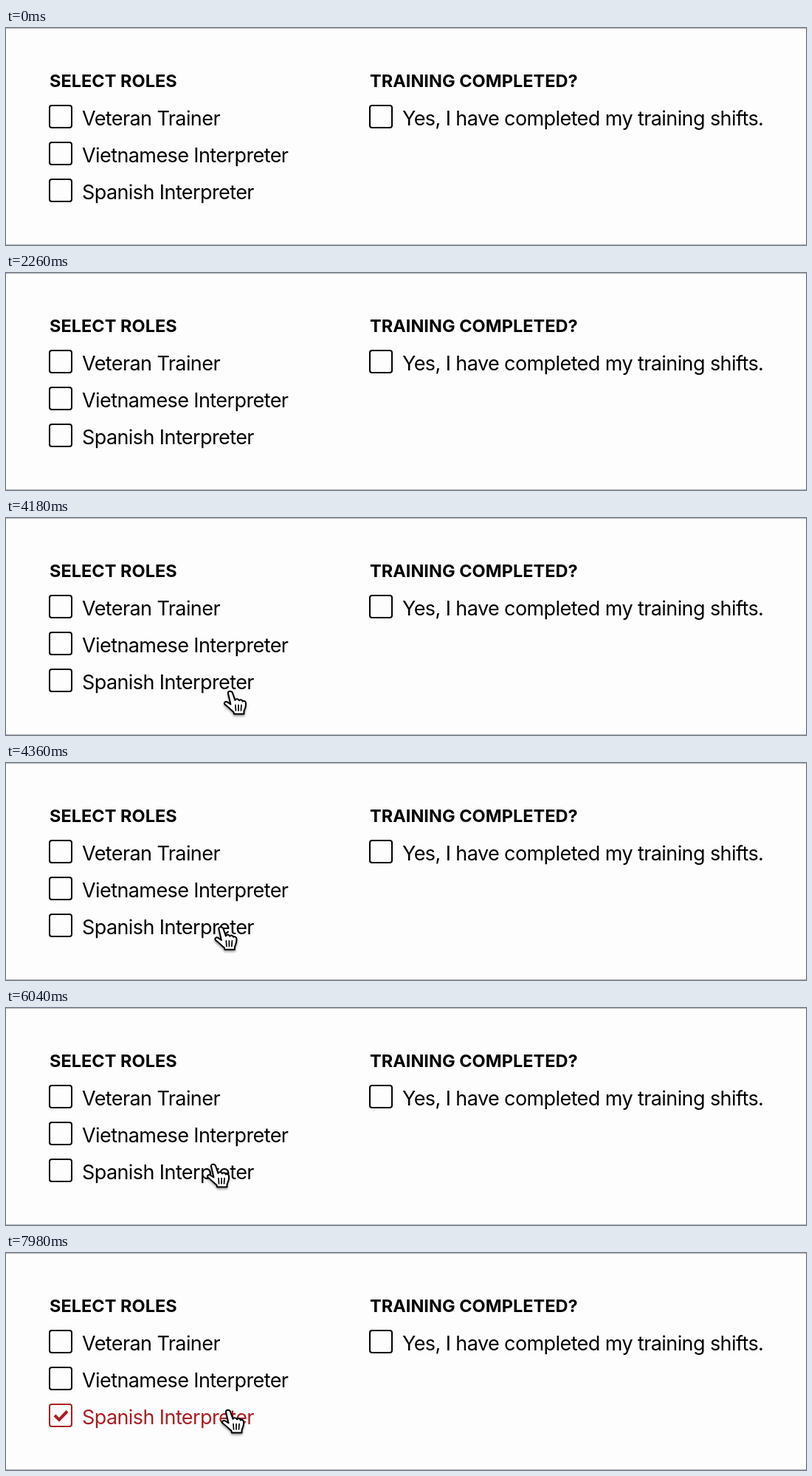
Animation of 1084x294 px, one loop 8 s. Source, as an HTML page:

```html
<!DOCTYPE html>
<html lang="en">
<head>
<meta charset="utf-8">
<title>Select roles</title>
<style>
  html, body { margin: 0; width: 100%; height: 100%; overflow: hidden; background: #fdfdfd; }
  svg { display: block; width: 1084px; height: 294px; }
  text { font: 400 27px Inter, "Open Sans", sans-serif; letter-spacing: -0.59px; fill: currentColor; }
  .heading { font-weight: 700; font-size: 23.5px; letter-spacing: 0.03px; }
  .option { color: #000; }
  .option rect { fill: none; stroke: currentColor; stroke-width: 2; }
  .tick { fill: none; stroke: currentColor; stroke-width: 4; visibility: hidden; }
  .checked { color: #a91e22; }
  .checked .tick { visibility: visible; }
  .rule { fill: #b3b3b3; }
  #hand { filter: drop-shadow(0 2px 1.5px #0006); }
</style>
</head>
<body>
<svg id="stage" viewBox="0 0 1084 294">
  <rect class="rule" width="1084" height="1"/>
  <rect class="rule" y="293" width="1084" height="1"/>
  <text class="heading" x="59" y="80">SELECT ROLES</text>
  <text class="heading" x="493" y="80">TRAINING COMPLETED?</text>
  <g id="options"></g>
  <g id="hand" stroke="#000" stroke-linejoin="round" stroke-linecap="round">
    <path fill="#fff" stroke-width="2" d="M-3 2.5C-3.5-.8 1.8-1.2 3 2L6.5 12C7.5 9.5 11.5 10 12 12.5
      C13 10.5 16.3 11 16.7 13.5C18.5 12 21.5 13.5 21 17C21.5 21.5 19 25 18.5 27V30.5H5L4.5 28
      C1 25-3 21-7 18C-9.5 15.5-6.5 13-4 14.5L.5 17.5Z"/>
    <path fill="none" stroke-width="1.7" d="M7 18.5L7.5 26M11 18.5V26M15 18.5L14.5 26"/>
  </g>
</svg>
<script>
const LOOP = 8000, CHECK_TIME = 6200, ENTER_TIME = 3700;

const options = [
  [58, 104, "Veteran Trainer"],
  [58, 154, "Vietnamese Interpreter"],
  [58, 204, "Spanish Interpreter"],
  [492, 104, "Yes, I have completed my training shifts."]
];
document.getElementById("options").innerHTML = options.map(([x, y, label]) => `
  <g class="option" transform="translate(${x} ${y})">
    <rect x="1" y="1" width="30" height="30" rx="3"/>
    <path class="tick" d="M8 16L14 22L25 10.5"/>
    <text x="45" y="28">${label}</text>
  </g>`).join("");

const linear = u => u;
const easeOut = u => u * (2 - u);
const smooth = u => u * u * (3 - 2 * u);

// Pointer stops: time, x, y, easing used to arrive there
const stops = [
  [ENTER_TIME, 352, 300, linear],
  [4080, 312, 247, linear],
  [4180, 304, 235, linear],
  [4730, 281, 212, easeOut],
  [7540, 281, 212, linear],
  [7780, 304, 215, smooth],
  [7980, 301, 213, smooth]
];

function pointerAt(time) {
  const next = stops.findIndex(stop => stop[0] > time);
  if (next < 1) return stops[stops.length - 1].slice(1, 3);
  const [t0, x0, y0] = stops[next - 1];
  const [t1, x1, y1, ease] = stops[next];
  const u = ease((time - t0) / (t1 - t0));
  return [x0 + (x1 - x0) * u, y0 + (y1 - y0) * u];
}

const hand = document.getElementById("hand");
const spanish = document.querySelectorAll(".option")[2];

function draw() {
  const time = performance.now() % LOOP;
  const visible = time >= ENTER_TIME;
  hand.setAttribute("visibility", visible ? "visible" : "hidden");
  if (visible) hand.setAttribute("transform", `translate(${pointerAt(time)})`);
  spanish.classList.toggle("checked", time >= CHECK_TIME);
  requestAnimationFrame(draw);
}
draw();
</script>
</body>
</html>
```
